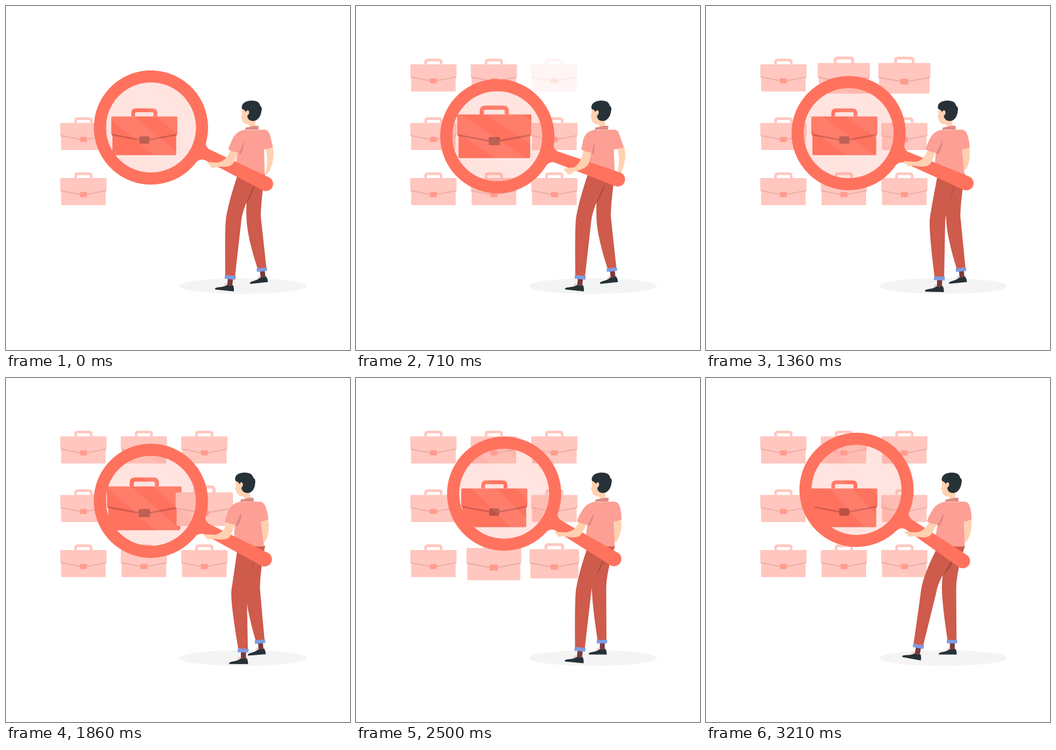
These frames come from a looping animation (640 px wide and 640 px high, 3430 ms). An HTML page with a canvas:

```html
<!DOCTYPE html>
<html lang="en">
<head>
<meta charset="utf-8">
<title>Job search</title>
<style>
html, body { margin: 0; width: 100%; height: 100%; overflow: hidden; background: #fff; }
canvas { display: block; width: 640px; height: 640px; }
</style>
</head>
<body>
<canvas id="stage" width="640" height="640"></canvas>
<script>
const ctx = document.getElementById('stage').getContext('2d');
const LOOP = 3430, FPS = 14, LAST = 45;
const CORAL = '#ff725e', SHIRT = '#fd9f94', FOLD = '#dd8a81', SKIN = '#ffd1b0';
const PANTS = '#ce5b4b', SHADE = '#ad4b3f', DARK = '#263238', CUFF = '#7f9ce3', SOCK = '#7b3a3c';

// Key points as [time, value]; everything else follows from these.
const TILT = [[0, 26.1], [900, 18], [1357, 23], [1857, 27.2], [2214, 27.4], [2450, 31.5], [2786, 26.2], [3000, 33.8]];
const PULL = [[0, 0.3], [860, 1.1], [1357, 0]];
const LEAN = [[640, 0], [1857, 5], [2214, 0]];
const FRONT_FOOT = [[860, 417], [1357, 434], [1857, 441], [2214, 438], [2786, 395]];
const BACK_FOOT = [[860, 476], [1857, 472.5], [2214, 457.5]];
const BEATS = [685, 1830, 3143];

const clamp = v => Math.max(0, Math.min(1, v));
const rad = deg => deg * Math.PI / 180;
const pulse = (t, peak, half) => clamp(1 - Math.abs(t - peak) / half);

function at(keys, t) {
  const i = keys.findIndex(k => k[0] > t);
  if (i === 0) return keys[0][1];
  if (i < 0) return keys[keys.length - 1][1];
  const [t0, a] = keys[i - 1], [t1, b] = keys[i];
  return a + (b - a) * (t - t0) / (t1 - t0);
}

function fill(d, color) {
  ctx.fillStyle = color;
  ctx.fill(new Path2D(d));
}

function line(d, color, width) {
  ctx.strokeStyle = color;
  ctx.lineWidth = width;
  ctx.stroke(new Path2D(d));
}

function place(x, y, deg, scale, draw) {
  ctx.save();
  ctx.translate(x, y);
  ctx.rotate(rad(deg));
  ctx.scale(scale, scale);
  draw();
  ctx.restore();
}

function briefcase(x, y, scale, body, seam, clasp) {
  place(x, y, 0, scale, () => {
    line('M-14.5-20V-24Q-14.5-28-10.5-28H10.5Q14.5-28 14.5-24V-20', body, 4.8);
    fill('M-41.5-20H41.5Q43-20 43-18.5V2Q43 4 41.5 5V29Q41.5 30.5 40 30.5H-40Q-41.5 30.5-41.5 29V5Q-43 4-43 2V-18.5Q-43-20-41.5-20Z', body);
    line('M-42 3.8L-6 10.5H6L42 3.8', seam, 2);
    ctx.fillStyle = clasp;
    ctx.beginPath();
    ctx.roundRect(-6.5, 6, 13, 9.5, 1.5);
    ctx.fill();
  });
}

function bigCase(t) {
  const beat = Math.max(...BEATS.map(peak => pulse(t, peak, 71)));
  briefcase(257.3, 234, 1.43 * (1 + 0.21 * beat), CORAL, '#c4554a', '#a84a3f');
}

// Cases fade in column by column, upwards, then pulse row by row around the big one.
function caseGrid(t) {
  for (let row = 0; row < 3; row++) {
    for (let col = 0; col < 3; col++) {
      if (row === 1 && col === 1) {
        bigCase(t);
        continue;
      }
      const order = col * 3 + 2 - row;
      const slot = row === 1 ? col / 2 : col;
      const shown = order < 2 ? 1 : clamp((t + 5 - order * 104 + 145) / 120 - 0.05);
      const beat = pulse(t, 1035 + 595 * row + 215 * slot, 220);
      ctx.globalAlpha = order < 2 ? shown : clamp((t - 692 + 104.5 * (8 - order)) / 125);
      briefcase(144 + 112.5 * col, 128.5 + 109 * row - 3.25 * row * (row - 1) / 2 * 2,
        1 + 0.255 * beat, '#ffc7bf', '#ebada6', '#ff9c8e');
      ctx.globalAlpha = 1;
    }
  }
}

// The lens swings about the point where the handle is held.
function magnifier(t, lean) {
  place(408 - 0.3 * lean, 293.8 + lean, at(TILT, t), 1, () => {
    ctx.translate(-154, 0);
    ctx.save();
    ctx.beginPath();
    ctx.arc(0, 0, 85, 0, 7);
    ctx.clip();
    ctx.fillStyle = 'rgba(255,114,94,.2)';
    ctx.fillRect(-90, -90, 180, 180);
    ctx.rotate(rad(14));
    ctx.fillStyle = 'rgba(255,255,255,.08)';
    ctx.fillRect(-100, 4, 200, 32);
    ctx.fillRect(-100, -60, 200, 38);
    ctx.restore();
    ctx.strokeStyle = CORAL;
    ctx.lineWidth = 22.5;
    ctx.beginPath();
    ctx.arc(0, 0, 95, 0, 7);
    ctx.stroke();
    fill('M102-25Q105-12 116-11.3L238-13.5A13.5 13.5 0 0 1 238 13.5L117 10.3Q108 10 102 24Z', CORAL);
  });
}

const drawCuff = () => fill('M-10-3.5H10.5L10 3.5H-10Z', CUFF);

function drawFoot() {
  line('M-10 17L-7 12M-7 16L-5 12', '#f4a59c', 1);
  fill('M-4 2H5.5V16H-4Z', SOCK);
  fill('M-26 24Q-26 21.5-17 20Q-9 18.5-5 15Q2 16.5 7 14Q9.5 19 9.5 25.3H-25Q-26 25-26 24Z', DARK);
}

function backLeg(t) {
  const x = at(BACK_FOOT, t), y = 490.5;
  const knee = 461 + (x - 476) * 0.46, turn = (457 - x) * 0.32;
  place(x, y, turn, 0.95, drawFoot);
  fill(`M450 325Q${knee - 15} 365 ${knee - 13.5} 397Q${knee - 12} 430 ${x - 8} ${y - 2}
    L${x + 8.5} ${y - 3}L${knee + 13} 391Q${knee + 13.5} 360 482 312L430 310Z`, PANTS);
  place(x, y, turn, 0.95, drawCuff);
}

function frontLeg(t) {
  const x = at(FRONT_FOOT, t), back = 441 - x;
  const y = 507 - 8 * (back / 46) ** 2;
  const knee = 434 - back * 0.42, turn = back * 0.23;
  const tip = 453 - back * 0.26;
  fill(`M456 334L464 331Q459 349 ${tip} 368Z`, SHADE);
  place(x, y, turn, 1, drawFoot);
  fill(`M431 314Q${knee - 10} 365 ${knee - 14.5} 394Q${knee - 17} 415 ${x - 9} ${y - 4}
    L${x + 9} ${y - 1}L${knee + 14} 398Q${knee + 17} 375 462 333L464 316Z`, PANTS);
  place(x, y, turn, 1, drawCuff);
}

function upperBody(pull, lean) {
  const b = 9 * Math.sqrt(pull), slant = Math.tan(rad(lean));
  ctx.save();
  ctx.transform(1, 0, slant, 1, -330 * slant, 0);

  fill(`M${481 + b / 2} 258H${493 + b / 2}C${495 + b} 275 ${494 + b} 288 ${486 + b * 0.6} ${303 + b * 1.4}
    L${480 + b * 0.5} ${306 + b * 1.6}Q${482 + b * 1.3} 288 ${480 + b * 0.7} 262Z`, SKIN);
  fill(`M440 231L481 230Q488 230 491 240Q494 250 ${494 + b * 0.5} 263Q488 266 480 267
    L481.5 313.5H428V290L431 270Z`, SHIRT);

  fill('M439 190V203L436 205.5L438.5 207.5Q439 219 448 220L453 221V229L464 226V198Z', SKIN);
  fill('M439 191C437 181 447 176 457 176C466 175.5 472 179 473 186C477 188 476 193 475 197C474 205 468 214 460 214C453 214 449 210 449 204C454 201 453 193 449 194L446 197L444 194Z', DARK);
  fill('M446 226L453 225Q462 222 470 223L469.5 230H445Z', FOLD);
  ctx.restore();
}

function frontArm(pull, lean) {
  const s = -2.5 + 8.5 * pull - 0.8 * lean;
  const ex = 414 + 14 * pull - 0.4 * lean, ey = 291 + 3 * pull + 0.7 * lean;
  const hx = 369 + 18 * pull - 0.4 * lean, hy = 287 + 18 * pull + lean;
  const rise = (ey - hy) * 0.33, dx = -1.75 * lean;
  fill(`M${418 + s} 266Q${ex - 7} ${ey - 4} ${hx + 20} ${hy - 1 + rise}L${hx + 7} ${hy - 1.5 + rise / 2}
    Q${hx - 1} ${hy - 2} ${hx} ${hy}L${hx + 5} ${hy + 4}L${hx + 8} ${hy + 8.5}L${hx + 14} ${hy + 8}
    Q${hx + 16} ${hy + 6} ${hx + 20} ${hy + 6.5 + rise}Q${ex + 2} ${ey + 9} ${ex + 6} ${ey - 2}L${433 + s} 270Z`, SKIN);
  fill(`M${443 + dx * 0.7} 249L${432 + s} 273L${437 + s} 276Q${443 + s * 0.4} 263 ${443 + dx * 0.7} 249Z`, FOLD);
  fill(`M${448 + dx} 230Q${429 + dx} 231 ${421 + dx * 0.6 + s * 0.4} 248Q${416 + s} 258 ${413.5 + s} 267
    Q${423 + s} 272 ${433.5 + s} 273L${444 + dx * 0.7} 249Z`, SHIRT);
}

function draw(t) {
  ctx.fillStyle = '#fff';
  ctx.fillRect(0, 0, 640, 640);
  ctx.fillStyle = '#f4f4f4';
  ctx.beginPath();
  ctx.ellipse(441, 521, 119.5, 14.5, 0, 0, 7);
  ctx.fill();

  const lean = at(LEAN, t), pull = at(PULL, t);
  caseGrid(t);
  backLeg(t);
  frontLeg(t);
  upperBody(pull, lean);
  magnifier(t, lean);
  frontArm(pull, lean);
}

function tick() {
  const t = performance.now() % LOOP;
  const step = Math.min(LAST, Math.floor((t + 5) * FPS / 1000));
  draw(step * 1000 / FPS);
  requestAnimationFrame(tick);
}
tick();
</script>
</body>
</html>
```
